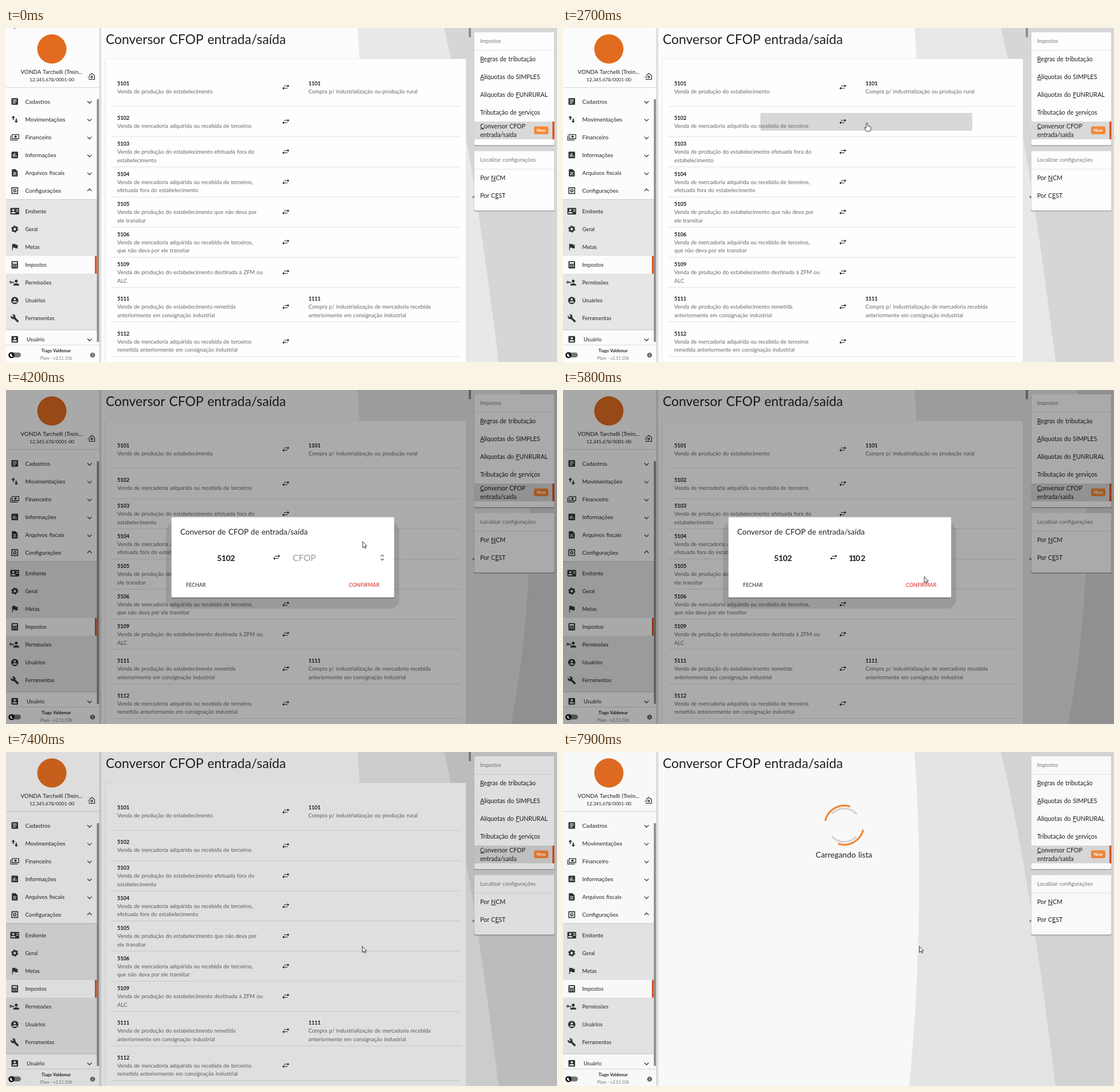
An HTML page for the animation above (8 s loop, 961 by 582 pixels).

```html
<!DOCTYPE html>
<html lang="pt-BR">
<head>
<meta charset="utf-8">
<title>Conversor CFOP</title>
<style>
html, body { margin: 0; width: 100%; height: 100%; overflow: hidden; background: #fcfcfc; }
svg { display: block; width: 961px; height: 582px; }
text { font-family: Lato, "Open Sans", sans-serif; word-spacing: .06em; white-space: pre; }
.code { letter-spacing: -.03em; font-weight: 700; fill: #1c1c1c; }
.u { text-decoration: underline; }
.line { fill: none; stroke: #222; stroke-width: 1.1; }
</style>
</head>
<body>
<svg id="stage" viewBox="0 0 961 582"></svg>
<script>
const text = (x, y, s, size, fill = '#222', more = '') =>
  `<text x="${x}" y="${y}" font-size="${size}" fill="${fill}" ${more}>` +
  s.replace(/_(.)/g, '<tspan class="u">$1</tspan>') + '</text>';
const rect = (x, y, w, h, fill, more = '') =>
  `<rect x="${x}" y="${y}" width="${w}" height="${h}" fill="${fill}" ${more}/>`;
const circle = (x, y, r, fill, more = '') =>
  `<circle cx="${x}" cy="${y}" r="${r}" fill="${fill}" ${more}/>`;
const path = (d, more = '') => `<path d="${d}" ${more}/>`;
const group = (id, body, more = '') => `<g id="${id}" ${more}>${body}</g>`;
const middle = 'text-anchor="middle" ';
const bold = 'font-weight="700"';

// Icons on a 24 unit grid
const square = 'M5 3H19Q21 3 21 5V19Q21 21 19 21H5Q3 21 3 19V5Q3 3 5 3Z';
const person = 'M12 6a3 3 0 0 1 0 6a3 3 0 0 1 0-6ZM6 18v-1q0-3 6-3t6 3v1Z';
const stroke = (d, color, w = 2, more = '') => path(d, `fill="none" stroke="${color}" stroke-width="${w}" ${more}`);
const gear = (r, w, teeth) => circle(12, 12, r, 'none', `stroke="#333" stroke-width="${w}"`) +
  circle(12, 12, r * 1.4, 'none', `stroke="#333" stroke-width="${w * .8}" stroke-dasharray="${r * 1.4 * Math.PI / teeth}"`);
const icons = {
  article: path(square + 'M7 7h10v2H7ZM7 11h10v2H7ZM7 15h7v2H7Z'),
  swap: path('M8 2L3 8H6.5V14H9.5V8H13ZM16 22L21 16H17.5V10H14.5V16H11Z'),
  money: stroke('M5 5H23V16H5ZM1 8V20H20', '#333') + circle(14, 10.5, 3.2, '#333'),
  chart: path(square + 'M7 10h2v7H7ZM11 7h2v10h-2ZM15 13h2v4h-2Z'),
  file: path('M6 2H14L20 8V20Q20 22 18 22H6Q4 22 4 20V4Q4 2 6 2Z') +
    stroke('M8 18L16 10M8 11h3M13 17h3', '#fff'),
  config: stroke('M4 4H20V20H4Z', '#333', 2.4) + gear(3, 2, 4),
  card: path('M2 3H22Q24 3 24 5V19Q24 21 22 21H2Q0 21 0 19V5Q0 3 2 3ZM8 6a3 3 0 0 1 0 6a3 3 0 0 1 0-6ZM2 18v-1q0-3 6-3t6 3v1ZM16 7h6v2h-6ZM16 11h6v2h-6Z'),
  gear: gear(5.6, 4.4, 6),
  flag: path('M14.4 6L14 4H5V21H7V14H12.6L13 16H20V6Z'),
  calc: path('M5 2H19Q21 2 21 4V20Q21 22 19 22H5Q3 22 3 20V4Q3 2 5 2ZM6 5V9H18V5Z') +
    stroke('M6 13H18M6 17H18', '#fff', 2.4, 'stroke-dasharray="2.6 2.1"'),
  access: path('M16 4a4 4 0 0 1 0 8a4 4 0 0 1 0-8ZM8 20v-2q0-4 8-4t8 4v2Z') +
    circle(1, 11, 2.4, 'none', 'stroke="#333" stroke-width="2"') + stroke('M3 11H10M8 11V14', '#333'),
  user: path('M12 2a10 10 0 0 1 0 20a10 10 0 0 1 0-20Z' + person),
  tool: path('M22.7 19L13.6 9.9C14.5 7.6 14 4.9 12.1 3C10.1 1 7.1.6 4.7 1.7L9 6L6 9L1.6 4.7C.4 7.1.9 10.1 2.9 12.1C4.8 14 7.5 14.5 9.8 13.6L18.9 22.7Q19.6 23.3 20.3 22.7L22.6 20.4Q23.3 19.7 22.7 19Z'),
  box: path(square + person)
};
const icon = (name, y) =>
  `<g transform="translate(7.6 ${y - 7.7}) scale(.64)" fill="#333" fill-rule="evenodd">${icons[name]}</g>`;

const chevron = (y, up) => path(up ? `M142 ${y}l3.7-3.7 3.7 3.7` : `M142 ${y - 1}l3.7 3.7 3.7-3.7`, 'class="line"');
const arrows = (x, y) => `<g transform="translate(${x} ${y})" fill="#222">` +
  path('M-3-2.5H3V-4.6L6-2 3 .6V-1.4H-3Z') + path('M3 1.5H-3V-.6L-6 2-3 4.6V2.6H3Z') + '</g>';

function sidebar() {
  const main = [['article', 'Cadastros'], ['swap', 'Movimentações'], ['money', 'Financeiro'],
    ['chart', 'Informações'], ['file', 'Arquivos fiscais'], ['config', 'Configurações']];
  const sub = [['card', 'Emitente'], ['gear', 'Geral'], ['flag', 'Metas'], ['calc', 'Impostos'],
    ['access', 'Permissões'], ['user', 'Usuários'], ['tool', 'Ferramentas']];
  return rect(0, 0, 163, 582, '#fcfcfc') + rect(163, 0, 1.5, 582, '#c9c9c9') + rect(164.5, 0, 2, 582, '#e6e6e6') +
    circle(80, 36.5, 25.5, '#e16c20') +
    text(79.5, 80, 'VONDA Tarchelli (Trein...', 9.9, '#222', middle) +
    text(80, 93, '12.345.678/0001-00', 8.3, '#222', middle) +
    path('M145 83L149.7 79 154.5 83V89.5H145V87.5M142.5 85.3H151M148.7 82.8L151.2 85.3 148.7 87.8', 'class="line"') +
    rect(0, 103, 163, 1, '#d8d8d8') +
    main.map(([name, label], i) => {
      const y = 128 + i * 31.1;
      return icon(name, y) + text(33.5, y + 3.5, label, 10) + chevron(y + .5, i == 5);
    }).join('') +
    rect(0, 299, 159, 227, '#e6e6e6') + rect(0, 298.5, 159, 1, '#c4c4c4') + rect(0, 525.5, 159, 1, '#c4c4c4') +
    rect(0, 397, 159, 31, '#fcfcfc') + rect(155, 397, 3.5, 31, '#e3511f') +
    sub.map(([name, label], i) => {
      const y = 319.3 + i * 31.1;
      return icon(name, y) + text(33.5, y + 3.3, label, 9.3);
    }).join('') +
    icon('box', 542.5) + text(36, 545.5, 'Usuário', 9.3) + chevron(542.5) +
    rect(158.5, 124, 3.7, 423, '#8c8c8c') + rect(0, 552, 163, 1, '#d8d8d8') +
    text(87.5, 565, 'Tiago Valdemar', 7.4, '#222', middle + bold) +
    text(87.5, 578, 'Plam - v2.11.106', 7.3, '#777', middle) +
    rect(8, 565.5, 18, 8.5, '#777', 'rx="4.2"') + circle(9.5, 570, 5.3, '#111') +
    path('M10 567a3 3 0 1 0 2.4 4.6a3 3 0 0 1-2.4-4.6Z', 'fill="#fff"') +
    circle(151, 570, 4.3, '#666') + rect(150.5, 569.3, 1.1, 3.2, '#fff') + rect(150.5, 567.4, 1.1, 1.1, '#fff');
}

const rows = [
  [97, '5101', ['Venda de produção do estabelecimento'], '1101', ['Compra p/ industrialização ou produção rural']],
  [157, '5102', ['Venda de mercadoria adquirida ou recebida de terceiros']],
  [202, '5103', ['Venda de produção do estabelecimento efetuada fora do', 'estabelecimento']],
  [254.5, '5104', ['Venda de mercadoria adquirida ou recebida de terceiros,', 'efetuada fora do estabelecimento']],
  [307, '5105', ['Venda de produção do estabelecimento que não deva por', 'ele transitar']],
  [359.5, '5106', ['Venda de mercadoria adquirida ou recebida de terceiros,', 'que não deva por ele transitar']],
  [412, '5109', ['Venda de produção do estabelecimento destinada à ZFM ou', 'ALC']],
  [472, '5111', ['Venda de produção do estabelecimento remetida', 'anteriormente em consignação industrial'],
    '1111', ['Compra p/ industrialização de mercadoria recebida', 'anteriormente em consignação industrial']],
  [532.5, '5112', ['Venda de mercadoria adquirida ou recebida de terceiros', 'remetida anteriormente em consignação industrial']]
];
const entry = (x, y, code, lines) => text(x, y + 3.4, code, 9.5, '#1c1c1c', 'class="code"') +
  lines.map((s, i) => text(x, y + 17.3 + i * 14.3, s, 9.48, '#666')).join('');

function list() {
  return rect(172.5, 53.5, 630, 540, '#e4e4e4', 'rx="2"') + rect(173.5, 54, 628.5, 540, '#fefefe', 'rx="2"') +
    `<clipPath id="row">${rect(190, 148, 602, 31, '#000')}</clipPath>` +
    circle(529, 164, 0, '#000', 'id="ripple" clip-path="url(#row)"') +
    rows.map(([y, code, lines, code2, lines2], i) =>
      entry(194, y, code, lines) + (code2 ? entry(527.5, y, code2, lines2) : '') +
      arrows(488, y + (i < 2 ? 6 : 13.5)) +
      rect(184, i ? y + (i < 2 ? 32 : 39.5) : 136, 608, 1, '#e2e2e2')).join('') +
    rect(807, 0, 4, 16, '#8c8c8c');
}

function panels() {
  const panel = (y, h) => rect(816, y + 1, 141, h + .8, '#aaa', 'rx="2"') + rect(816.5, y, 140, h, '#fdfdfd', 'rx="2"') +
    rect(816.5, y + 31, 140, 1, '#e2e2e2');
  const item = (y, s) => text(827, y, s, 10.6, '#1c1c1c');
  return panel(7.5, 196.5) + panel(214.5, 103.5) + rect(816.5, 163, 140, 31, '#d9d9d9') + rect(953, 163, 3.5, 31, '#e3511f') +
    text(827, 26, 'Impostos', 9.1, '#777') + text(827, 233, 'Localizar configurações', 9.5, '#777') +
    item(58, '_Regras de tributação') + item(89, '_Alíquotas do SIMPLES') + item(120, 'Alíquotas do _FUNRURAL') +
    item(151, 'Tributação de _serviços') + item(174.5, '_Conversor CFOP') + item(189.5, 'entrada/saída') +
    item(265, 'Por _NCM') + item(296, 'Por C_EST') +
    rect(921, 171.5, 25, 13.5, '#f58634', 'rx="3"') + text(933.5, 181, 'New', 7.6, '#fff', middle + bold) +
    text(813, 296.5, '»', 10);
}

function dialog() {
  return rect(288.5, 221.5, 388.5, 142, '#000', 'rx="3" opacity=".25"') + rect(288.5, 221.5, 388.5, 140, '#fff', 'rx="2"') +
    text(304, 252, 'Conversor de CFOP de entrada/saída', 13.45) +
    text(368, 298.3, '5102', 14.1, '#1c1c1c', 'class="code"') + arrows(472, 291.5) +
    text(500, 298, 'CFOP', 15.4, '#999', 'id="hint"') +
    text('498.3 503.7 510.3 519.3', 298.3, '', 14.1, '#1c1c1c', 'id="typed" font-weight="700"') +
    rect(500, 282, 1, 21, '#111', 'id="caret"') +
    path('M653.7 290l2.6-2.6 2.6 2.6M653.7 294l2.6 2.6 2.6-2.6', 'id="spin" fill="none" stroke="#555" stroke-width="1.1"') +
    text(314, 343.2, 'FECHAR', 8.9) + text(598, 343.2, 'CONFIRMAR', 9, '#e01b1b');
}

// Two opposite quarter arcs around the spinner centre
const arcs = (id, r, color) => circle(490.5, 127.5, r, 'none',
  `id="${id}" stroke="${color}" stroke-width="3.2" stroke-linecap="round" stroke-dasharray="${r * Math.PI / 2}"`);

const stage = document.getElementById('stage');
stage.innerHTML =
  rect(0, 0, 961, 582, '#d6d6d6') +
  path('M0 0H764Q815 220 859 582H0Z', 'fill="#e8e8e8"') +
  path('M0 0H897Q936 290 881 582H0Z', 'id="wave" fill="#e8e8e8"') +
  path('M0 0H613Q633 270 604 582H0Z', 'fill="#fcfcfc"') +
  text(174, 28, 'Conversor CFOP entrada/saída', 22.9) +
  group('list', list()) +
  group('loading', arcs('outer', 34, '#f58634') + arcs('inner', 29, '#d6d6d6') +
    text(490, 184, 'Carregando lista', 13.7, '#222', middle)) +
  sidebar() + panels() +
  rect(0, 0, 961, 582, '#000', 'id="shade"') +
  group('modal', rect(264, 203, 437, 193, '#000', 'id="halo" rx="25"') +
    rect(279, 230, 407, 151, '#000', 'rx="17" opacity=".1"') + group('dialog', dialog())) +
  group('pointer',
    path('M0 0V10.8L2.6 8.5 4.3 12 5.8 11.3 4.2 7.9H7.4Z', 'id="arrow"') +
    path('M-1.3 1Q0-.8 1.3 1V5.5L6 6.6Q7 7 7 8.5V11L5.5 15H-.8L-4.6 9.6Q-4.6 8-3.2 8.3L-1.3 10Z', 'id="hand"') +
    path('M-2.5-7.5H2.5M0-7.5V7.5M-2.5 7.5H2.5', 'id="beam"'),
    'fill="#fff" stroke="#222" stroke-width=".9"');

const el = {};
stage.querySelectorAll('[id]').forEach(e => el[e.id] = e);
const set = (id, name, value) => el[id].setAttribute(name, value);
const show = (id, on) => set(id, 'visibility', on ? 'inherit' : 'hidden');
const clamp = v => Math.max(0, Math.min(1, v));
const within = (t, a, b) => t >= a && t < b;

// Time, x, y of the pointer's rests and turns
const route = [[0, 10, -11], [300, 10, -11], [1200, 545, 218], [1400, 545, 218], [1700, 537, 170], [2000, 537, 170],
  [2400, 530, 165], [2900, 530, 165], [3500, 510, 290], [3800, 510, 290], [4000, 622, 264], [5500, 622, 264],
  [5800, 630, 325], [5900, 630, 325], [6200, 635, 343], [6800, 635, 343], [7000, 621.5, 338.5], [8000, 621.5, 338.5]];
function pointerAt(t) {
  const i = route.findIndex(p => p[0] > t);
  const [t0, x0, y0] = route[i - 1], [t1, x1, y1] = route[i];
  const k = (t - t0) / (t1 - t0), e = k * k * (3 - 2 * k);
  return [x0 + (x1 - x0) * e, y0 + (y1 - y0) * e];
}

function draw(t) {
  const opening = clamp((t - 2900) / 150);
  const open = within(t, 2900, 7400);
  const loading = t >= 7500;

  set('pointer', 'transform', `translate(${pointerAt(t)})`);
  const hand = within(t, 1100, 2900) || within(t, 6000, 7400);
  const beam = within(t, 3400, 3900);
  show('hand', hand);
  show('beam', beam);
  show('arrow', !hand && !beam);

  show('wave', open);
  show('list', !loading);
  show('loading', loading);
  set('outer', 'transform', `rotate(${195 + (t - 7900) * .36} 490.5 127.5)`);
  set('inner', 'transform', `rotate(${226 - (t - 7900) * .36} 490.5 127.5)`);

  set('ripple', 'r', t < 2700 ? 0 : t < 2900 ? 185 : 360);
  set('ripple', 'opacity', .15 * (1 - opening));
  set('shade', 'opacity', open ? .22 + .11 * opening : loading ? .015 : t >= 7400 ? .12 : 0);

  show('modal', open);
  set('halo', 'opacity', .06 * (1 - opening));
  const s = .99 + .01 * opening;
  set('dialog', 'transform', `translate(482.5 291.5) scale(${s}) translate(-482.5 -291.5)`);
  const typed = t < 4600 ? 0 : Math.min(4, 1 + Math.floor((t - 4600) / 200));
  show('hint', !typed);
  el.typed.textContent = '1102'.slice(0, typed);
  set('caret', 'x', [500, 505, 510, 519, 528][typed]);
  show('caret', open && (within(t, 3700, 4200) || within(t, 4600, 5700) || within(t, 6200, 6700)));
  show('spin', open && within(t, 3200, 5700));
}

const start = performance.now();
function tick() {
  draw((performance.now() - start) % 8000);
  requestAnimationFrame(tick);
}
tick();
</script>
</body>
</html>
```
